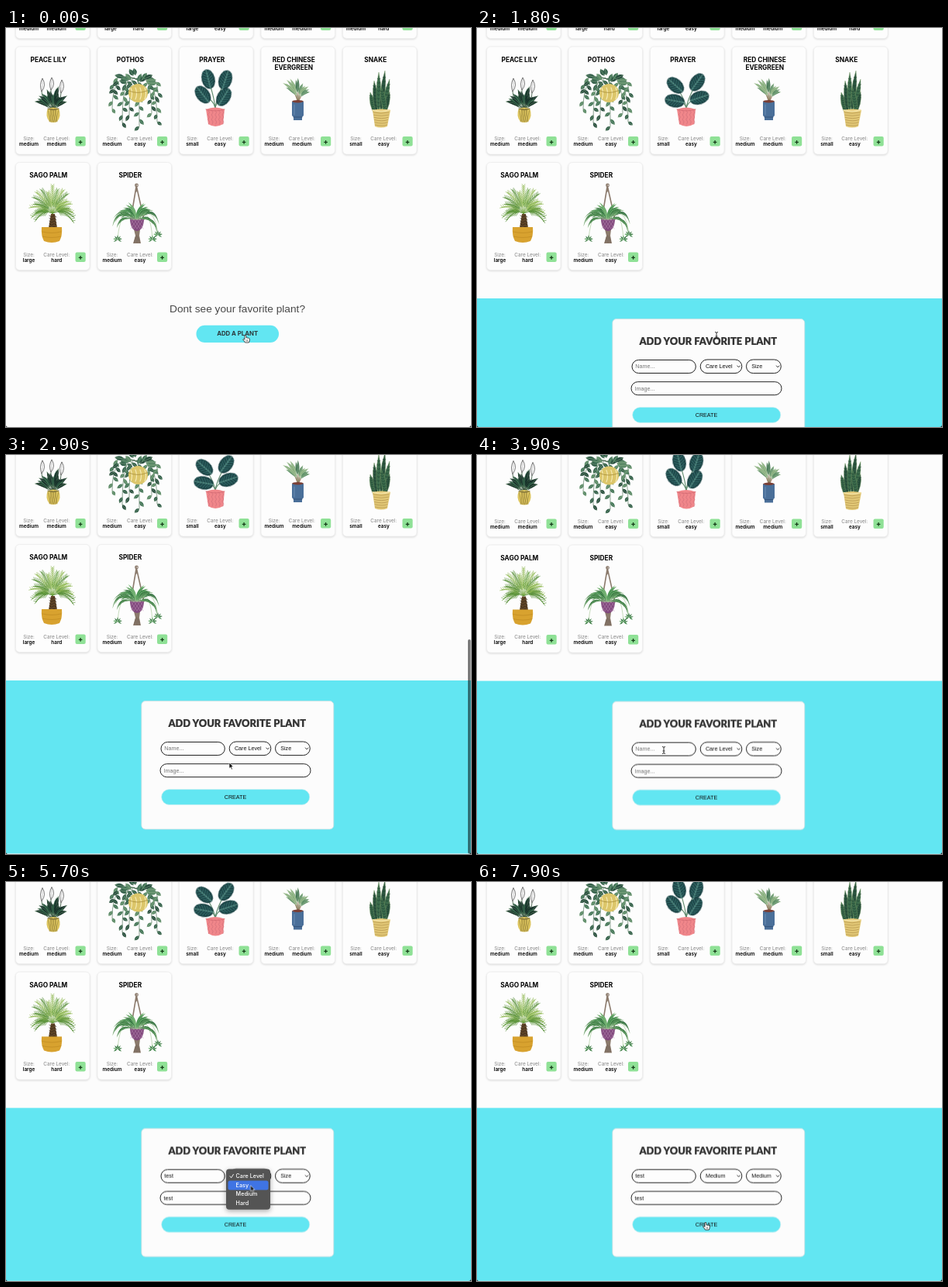
Write an HTML page that moves like this. It is 600 px wide and 515 px high and loops after 8 s.

```html
<!DOCTYPE html>
<html lang="en">
<head>
<meta charset="utf-8">
<title>Add a plant</title>
<style>
html, body { margin: 0; width: 100%; height: 100%; overflow: hidden; background: #fcfcfc; }
svg { display: block; width: 600px; height: 515px; }
text { font-family: "Liberation Sans", Arial, sans-serif; font-size: 7.2px; fill: #111; }
.mid { text-anchor: middle; }
.name { font: 700 8.3px Inter, sans-serif; fill: #000; }
.label { font: 400 6.4px Inter, sans-serif; fill: #858585; }
.value { font: 600 6.4px Inter, sans-serif; fill: #000; }
.plus { font: 800 9px Inter, sans-serif; fill: #143a18; }
.ask { font-size: 13.7px; fill: #484848; }
.add { font: 700 7.8px Inter, sans-serif; fill: #2c3a3d; }
.heading { font: 900 12.9px Lato, sans-serif; fill: #333; stroke: #333; stroke-width: .2; stroke-linejoin: round; }
.hint { fill: #757575; }
.item { font: 500 7.2px Inter, sans-serif; fill: #fff; }
.card { fill: #fdfdfd; stroke: #ececec; stroke-width: .8; filter: drop-shadow(0 1px 1px #0002); }
.field { fill: #fdfdfd; stroke: #222; }
.popup { fill: #545454; filter: drop-shadow(0 2px 3px #0005); }
.line { fill: none; stroke-linecap: round; stroke-linejoin: round; }
.leaf { animation: fold 4s ease-in-out infinite; }
.stem { fill: none; stroke: #5e8a6c; stroke-width: 1.1; animation: sway 4s ease-in-out infinite; }
#page { animation: scroll 8s linear infinite; }
#bar { animation: bar 8s linear infinite; }
#cursor { animation: move 8s ease-in-out infinite; }
@keyframes fold {
  0%, 30%, 88%, 100% { transform: var(--up); }
  36%, 82% { transform: var(--down); }
}
@keyframes sway {
  0%, 30%, 88%, 100% { d: var(--up); }
  36%, 82% { d: var(--down); }
}
@keyframes scroll {
  0%, 23.75% { transform: translateY(0); animation-timing-function: cubic-bezier(.3, .1, .3, 1); }
  32.5%, 37.5% { transform: translateY(-58px); }
  40%, 100% { transform: translateY(-57.4px); }
}
@keyframes bar {
  0%, 23.7% { opacity: 0; transform: translateY(-31px); }
  24.5% { opacity: 1; transform: translateY(-31px); animation-timing-function: cubic-bezier(.3, .1, .3, 1); }
  32.5%, 38% { opacity: 1; transform: none; }
  41%, 100% { opacity: 0; transform: none; }
}
@keyframes move {
  0%, 27% { transform: translate(309px, 397px); }
  33%, 38% { transform: translate(288px, 397px); }
  46%, 63% { transform: translate(241px, 381px); }
  66.5%, 69% { transform: translate(312px, 381px); }
  72% { transform: translate(316px, 393px); }
  74%, 75.5% { transform: translate(318px, 403px); }
  78%, 79% { transform: translate(364px, 382px); }
  81%, 81.8% { transform: translate(376px, 394px); }
  84%, 85.5% { transform: translate(373px, 403px); }
  89%, 90% { transform: translate(304px, 470px); }
  96%, 100% { transform: translate(295px, 440px); }
}
</style>
</head>
<body>
<svg id="stage" viewBox="0 0 600 515"></svg>
<script>
const LOOP = 8000, CYAN = '#62e6f2';
const sheet = document.head.appendChild(document.createElement('style'));
let shows = 0, seed = 7;

const rnd = (a, b) => {
  seed = (seed * 16807) % 2147483647;
  return a + (b - a) * seed / 2147483647;
};
const pick = list => list[Math.floor(rnd(0, list.length))];
const times = (n, fn) => Array.from({ length: n }, (_, i) => fn(i, n > 1 ? i / (n - 1) : 0)).join('');
const r1 = v => +v.toFixed(1);

// Style attribute that makes an element visible only in the given time spans.
function show(...spans) {
  const id = 'show' + shows++;
  const steps = spans.map(([a, b]) => `${a / LOOP * 100}%{opacity:1}${b / LOOP * 100}%{opacity:0}`).join('');
  sheet.append(`@keyframes ${id}{0%{opacity:0}${steps}}`);
  return `style="animation:${id} ${LOOP}ms step-end infinite"`;
}
const text = (s, x, y, cls = '', extra = '') => `<text x="${x}" y="${y}" class="${cls}" ${extra}>${s}</text>`;
const rect = (x, y, w, h, r, attrs) => `<rect x="${x}" y="${y}" width="${w}" height="${h}" rx="${r}" ${attrs}/>`;
const shape = (d, fill, attrs = '') => `<path d="${d}" fill="${fill}" ${attrs}/>`;
const line = (d, color, w = 1) => `<path class="line" d="${d}" stroke="${color}" stroke-width="${w}"/>`;
const polar = (x, y, deg, r) => {
  const a = deg * Math.PI / 180;
  return [x + Math.sin(a) * r, y - Math.cos(a) * r];
};
const quad = (a, b, c, t) => [0, 1].map(i => (1 - t) ** 2 * a[i] + 2 * t * (1 - t) * b[i] + t * t * c[i]);

// Pointed leaf from base to tip; bend bows it sideways.
function blade([x0, y0], [x1, y1], w, fill, bend = 0, vein = '', attrs = '') {
  const dx = x1 - x0, dy = y1 - y0, len = Math.hypot(dx, dy);
  const ctrl = k => `${r1((x0 + x1) / 2 - dy / len * k)} ${r1((y0 + y1) / 2 + dx / len * k)}`;
  const from = `${r1(x0)} ${r1(y0)}`, to = `${r1(x1)} ${r1(y1)}`;
  return shape(`M${from}Q${ctrl(bend + w)} ${to}Q${ctrl(bend - w)} ${from}`, fill, attrs) +
    (vein && line(`M${from}Q${ctrl(bend)} ${to}`, vein, .4));
}

function peaceLily() {
  const root = [61, 105];
  const buds = [[46, 82, 65], [58, 80, 64], [71, 84, 67]].map(([x, y, top]) =>
    line(`M${root}Q${x} 96 ${x} ${y}`, '#35523c', .8) +
    blade([x, y], [x + 1, top], 5, '#fff', 1, '#777', 'stroke="#222" stroke-width=".6"')).join('');
  const leaves = times(16, (i, u) => {
    const a = (u - .5) * 122 + rnd(-6, 6), r = rnd(16, 31) * (1 - Math.abs(u - .5) * .4);
    const tip = polar(...root, a, r + 2);
    return line(`M${root}L${polar(...root, a, r * .4)}`, '#28452f', .7) +
      blade(polar(...root, a, r * .3), tip, 4.4, pick(['#19352a', '#24503c', '#16302a']), -a / 16, '#8fb58a');
  });
  const pot = shape('M54 104Q61 101 68 104Q72 113 66 121Q61 123 56 121Q50 113 54 104', '#dcc45e') +
    times(4, i => line(`M${54 + i * 3} ${105 - i % 2}L${58 + i * 2.6} 121M${68 - i * 3} ${105 - i % 2}L${64 - i * 2.6} 121`, '#7d6b2e', .45)) +
    line('M54 104Q61 107 68 104', '#3e3a20', .7);
  return buds + leaves + pot;
}

function pothos() {
  const greens = ['#34604b', '#447559', '#284d3e', '#5c8a68'];
  const root = [168, 66];
  const pot = '<ellipse cx="170.500" cy="84" rx="12.500" ry="12" fill="#dcc66a"/>' +
    times(4, i => line(`M${161 + i * 6} 77q3 8 0 15`, '#f5eab4', 1.2)) +
    line('M158.500 81Q170 86 182 81', '#a98f3a', .8);
  const ends = [[138, 80], [137, 104], [150, 122], [159, 112], [172, 127], [188, 110], [195, 121], [196, 84]];
  const vines = ends.map(end => {
    const mid = [end[0], 54], n = Math.round((end[1] - 38) / 9);
    return line(`M${root}Q${mid} ${end}`, '#3f6348', .6) + times(n, (i, u) => {
      const p = quad(root, mid, end, .4 + u * .6);
      return blade(p, polar(...p, 180 + (i % 2 ? 42 : -42) + rnd(-15, 15), rnd(7, 10)), 4.4, pick(greens), 0, '#a8c59c');
    });
  }).join('');
  const crown = times(12, (i, u) => {
    const p = [153 + u * 31, 68 + rnd(-7, 3)];
    return blade(p, polar(...p, (u - .5) * 190 + rnd(-25, 25), rnd(9, 13)), 5.6, pick(greens), 0, '#a8c59c');
  });
  return vines + pot + crown;
}

// Leaves lift and lower; each has a raised and a lowered [x, y, angle].
function prayer() {
  const poses = [
    [[254, 86, -38], [255, 94, -80]], [[281, 89, 32], [287, 90, 72]],
    [[261, 66, -14], [256, 74, -48]], [[283, 67, 18], [284, 70, 36]]
  ];
  const both = fn => poses.map(([up, down]) => [fn(...up), fn(...down)]);
  const vars = ([up, down]) => `style="--up:${up};--down:${down}"`;
  const stems = both((x, y) => `path('M270 106Q270 94 ${x} ${y}')`).map(p => `<path class="stem" ${vars(p)}/>`).join('');
  const rx = 8.6, ry = 12.8;
  const face = `<ellipse rx="${rx}" ry="${ry}" fill="#1d4547"/>` +
    times(6, (i, u) => {
      const k = (u - .5) * 1.35 * ry, w = rx * .74 * Math.sqrt(1 - (k / ry) ** 2);
      return line(`M${r1(-w)} ${r1(k - 2)}L0 ${r1(k + 2)}L${r1(w)} ${r1(k - 2)}`, '#458a86', .7);
    }) + line(`M0 ${1 - ry}V${ry}`, '#82bfae', .7);
  const leaves = both((x, y, a) => `translate(${x}px,${y}px) rotate(${a}deg)`)
    .map(p => `<g class="leaf" ${vars(p)}>${face}</g>`).join('');
  const pot = shape('M258 105Q270 100 282 105L280 124Q270 130 261 124Z', '#f0868a') +
    times(5, i => line(`M${260.5 + i * 4.6} 106l2 3l-2 3l2 3l-2 3l2 3l-1 3`, '#d0707a', .7)) +
    line('M258 105Q270 109 282 105', '#d66d74', .9);
  return stems + leaves + pot;
}

function evergreen() {
  const root = [377, 96];
  const leaves = times(13, (i, u) => {
    const a = (u - .5) * 88 + rnd(-5, 5), r = rnd(20, 33);
    const start = polar(...root, a * .55, r * .4), tip = polar(...root, a, r);
    return line(`M${root}L${start}`, i % 3 ? '#6d8a5a' : '#b8605a', .6) +
      blade(start, tip, 3.4, pick(['#5d8f67', '#3f7351', '#86ad7d']), -a / 12, '#cfe0bd');
  });
  return leaves + '<ellipse cx="376.500" cy="95" rx="7.500" ry="2" fill="#7a3f35"/>' +
    shape('M369 95Q376.500 98 384 95V113L382 115V119H371V115L369 113Z', '#4a6f99') +
    line('M371 115H382', '#2f4d73', .8) + line('M372 99V112', '#6d90b6', 1);
}

function snake() {
  const tips = [[470, 83], [475, 68], [481, 57], [489, 55], [495, 66], [495, 82], [484, 76]];
  const leaves = tips.map(([x, y], i) => {
    const base = [476 + i * 2.4, 112];
    return blade(base, [x, y], 6.2, i % 2 ? '#2c5540' : '#3a6a4b', 0, '', 'stroke="#7f9f69" stroke-width=".4"') +
      times(8, (k, u) => {
        const p = quad(base, [(base[0] + x) / 2, (base[1] + y) / 2], [x, y], .2 + u * .65);
        return line(`M${r1(p[0] - 1.8)} ${r1(p[1])}l1.8 1l1.8 -1`, '#1c3b2c', .6);
      });
  }).join('');
  return leaves + shape('M473 106Q484 103 496 106L492 127Q484 130 476 127Z', '#e2c876') +
    times(6, i => line(`M${474 + i * .5} ${109 + i * 3.2}q10 2.500 ${20 - i} 0`, '#a98944', .6)) +
    line('M473 106Q484 109 495 106', '#f3e2a5', 1.5);
}

function sago() {
  const root = [60, 239];
  const fronds = times(19, (i, u) => {
    const a = (u - .5) * 225, r = rnd(23, 36) * (Math.abs(a) > 75 ? .82 : 1);
    const mid = polar(...root, a * .6, r * .6), tip = polar(...root, a, r);
    const leaflets = times(10, (k, v) => {
      const p = quad(root, mid, tip, .25 + v * .72);
      return [-32, 32].map(s => `M${p.map(r1)}L${polar(...p, a + s, 6 - v * 2.5).map(r1)}`).join('');
    });
    const color = pick(['#4f8a2e', '#2f5a22', '#8db84e', '#5f9a35']);
    return line(`M${root}Q${mid} ${tip}` + leaflets, color, .6);
  });
  return shape('M55 258L58 240H63L66 258Z', '#5f4527') +
    times(5, i => line(`M56 ${242 + i * 3.5}l3 2l3 -2l3 2`, '#35271a', .7)) + fronds +
    shape('M46 257H72Q73 268 69 275Q59 279 49 275Q45 268 46 257', '#d8a22f') +
    line('M47 263Q59 266 71 263M47 269Q59 272 71 269', '#bb861f', .6);
}

function spider() {
  const greens = ['#3f8a4a', '#2c6b3b', '#62a765', '#3c7d44'];
  const ropes = line('M168 205L161 247M168.500 205L178 247M168 202V211', '#8b7a6c', 1.6) +
    '<circle cx="168.500" cy="203" r="1.800" fill="none" stroke="#8b7a6c" stroke-width="1.200"/>';
  const tassel = shape('M165 260H173L172 268L174 278H164L167 268Z', '#8b7a6c') +
    line('M167 270L166 277M169 268V277M171 270L172 277', '#63564c', .6);
  const pot = shape('M160 245H178Q178 261 169 262Q160 261 160 245', '#80487c') +
    times(4, i => line(`M${161 + i * 4} 247l4 6l-4 6M${165 + i * 4} 247l-4 6l4 6`, '#b98bb2', .5));
  const leaves = times(24, (i, u) => {
    const s = u * 2 - 1, side = Math.sign(s), reach = Math.abs(s);
    const tip = [168 + side * (9 + reach * rnd(18, 23)), 224 + reach * rnd(20, 48)];
    return blade([168 + s * 5, 247], tip, 2.9, pick(greens), -side * (4 + reach * rnd(10, 20)), '#b9d8a6');
  });
  const babies = [[144, 273], [189, 273], [196, 267]].map(p =>
    line(`M169 247Q${(p[0] + 169) / 2 + (p[0] - 169) * .35} 225 ${p}`, '#8fb878', .5) +
    times(7, (i, u) => blade(p, polar(...p, -120 + u * 240, 6), 1.6, pick(greens)))).join('');
  return ropes + tassel + pot + babies + leaves;
}

function card(col, top, name, size, care, plant) {
  const x = 12.5 + col * 105.5;
  const wide = size === 'medium' && care === 'easy';
  const sx = x + (wide ? 19 : 17), cx = x + (wide ? 55 : 52.8);
  const title = [name].flat().map((s, i) => text(s, x + 42.3, top + 19.6 + i * 10, 'name mid')).join('');
  return rect(x, top, 95.5, 139, 5, 'class="card"') + title + (plant ? plant() : '') +
    text('Size:', sx, top + 121.2, 'label mid') + text(size, sx, top + 128.2, 'value mid') +
    text('Care Level:', cx, top + 121.2, 'label mid') + text(care, cx, top + 128.2, 'value mid') +
    rect(x + 77, top + 116, 13.2, 12.5, 2, 'fill="#8fe196"') + text('+', x + 83.6, top + 125.6, 'plus mid');
}

const cards = [
  [0, -125.5, '', 'medium', 'medium'], [1, -125.5, '', 'large', 'hard'], [2, -125.5, '', 'large', 'easy'],
  [3, -125.5, '', 'medium', 'medium'], [4, -125.5, '', 'medium', 'hard'],
  [0, 24, 'PEACE LILY', 'medium', 'medium', peaceLily], [1, 24, 'POTHOS', 'medium', 'easy', pothos],
  [2, 24, 'PRAYER', 'small', 'easy', prayer],
  [3, 24, ['RED CHINESE', 'EVERGREEN'], 'medium', 'medium', evergreen], [4, 24, 'SNAKE', 'small', 'easy', snake],
  [0, 173.5, 'SAGO PALM', 'large', 'hard', sago], [1, 173.5, 'SPIDER', 'medium', 'easy', spider]
].map(c => card(...c)).join('');

const OPEN = 1200, NAME = 4000, IMAGE = 4550, CARE = [5350, 6000], SIZE = [6300, 6850];

const prompt = `<g ${show([0, OPEN])}>` +
  text('Dont see your favorite plant?', 298.5, 367, 'ask mid') +
  rect(245.5, 383.8, 106.5, 22.2, 11, `fill="${CYAN}"`) + text('ADD A PLANT', 298.7, 397.3, 'add mid') + '</g>';

// Field text typed letter by letter, with its caret.
function typed(hint, x, y, keys, focus, blur) {
  const word = 'test', ends = [0, 2, 6, 9.6, 11.6];
  const marks = [focus, ...keys, blur];
  return text(hint, x, y, 'hint', show([0, keys[0]])) +
    keys.map((k, i) => text(word.slice(0, i + 1), x, y, '', show([k, keys[i + 1] || LOOP]))).join('') +
    ends.map((w, i) => rect(x + w + .3, y - 6.5, .7, 8, 0, show([marks[i], marks[i + 1]]))).join('');
}
function select(x, w, label, chosenAt) {
  return rect(x, 428, w, 17.6, 8.8, 'class="field"') +
    text(label, x + 6.7, 439.4, '', show([0, chosenAt])) + text('Medium', x + 6.7, 439.4, '', show([chosenAt, LOOP])) +
    line(`M${x + w - 6} 436l1.800 1.900l1.800 -1.900`, '#222', .9);
}
const form = `<g ${show([OPEN, LOOP])}>` + rect(0, 349, 600, 223.4, 0, `fill="${CYAN}"`) +
  rect(174.8, 375.6, 248, 165.4, 5, 'fill="#fcfcfc" stroke="#c9dfe1" stroke-width=".8"') +
  text('ADD YOUR FAVORITE PLANT', 298.3, 409.3, 'heading mid') +
  rect(200, 428.5, 82.3, 17, 8.5, 'class="field"') +
  typed('Name...', 204.3, 439.4, [4100, 4200, 4300, 4400], NAME, IMAGE) +
  select(288.2, 53.6, 'Care Level', CARE[1]) + select(347.5, 44.8, 'Size', SIZE[1]) +
  rect(199, 456.7, 194, 17, 8.5, 'class="field"') +
  typed('Image...', 203.6, 467.6, [4650, 4750, 4850, 4950], IMAGE, 5300) +
  rect(200.6, 489.6, 191.2, 19.8, 9.9, `fill="${CYAN}" stroke="#d4eef0" stroke-width=".6"`) +
  text('CREATE', 296, 502, 'mid') + '</g>';

// Dark option list; hovers holds the start time of each option's highlight.
function popup(x, w, items, hovers, [from, to]) {
  const ends = [...hovers.slice(1), to];
  return `<g ${show([from, to])}>` + rect(x, 370.5, w, 52.2, 4, 'class="popup"') +
    hovers.map((h, i) => rect(x + 2.5, 374 + i * 11.6, w - 5, 11.8, 2.5, `fill="#3f74e4" ${show([h, ends[i]])}`)).join('') +
    line(`M${x + 5} 379.800l1.600 2l2.800 -4.400`, '#fff', .9) +
    items.map((s, i) => text(s, x + 12.6, 382.2 + i * 11.6, 'item')).join('') + '</g>';
}
const popups =
  popup(284, 57, ['Care Level', 'Easy', 'Medium', 'Hard'], [5350, 5650, 5850], CARE) +
  popup(343, 47.5, ['Size', 'Small', 'Medium', 'Large'], [6300, 6400, 6650], SIZE);

const cursor = '<g id="cursor">' +
  `<g ${show([0, OPEN], [7380, LOOP])}>` +
  shape('M-1 0Q0 -1.500 1 0V3Q2 2.200 2.600 3.200Q3.600 2.500 4.200 3.600Q5.400 3.300 5.400 4.600Q5.400 7 4.300 9H-.5Q-1.500 7 -3.300 5Q-3 3.700 -1 5Z', '#fff', 'stroke="#222" stroke-width=".8"') +
  line('M.9 5.500V7.500M2.500 5.500V7.500', '#222', .5) + '</g>' +
  `<g ${show([OPEN, 2100], [3450, 4100])}>` +
  line('M-1.600 -4.500Q0 -4.500 0 -3.500V3.500Q0 4.500 -1.600 4.500M1.600 -4.500Q0 -4.500 0 -3.500M0 3.500Q0 4.500 1.600 4.500M-1 1H1', '#222', .9) + '</g>' +
  `<g ${show([2100, 3450], [5050, 7380])}>` +
  shape('M0 0V7.600L1.700 6L3 9L4.300 8.400L3 5.500H5.300Z', '#111', 'stroke="#fff" stroke-width=".6"') + '</g></g>';

document.getElementById('stage').innerHTML =
  rect(0, 0, 600, 515, 0, 'fill="#fcfcfc"') + `<g id="page">${cards}${prompt}${form}</g>` + popups +
  rect(596, 238, 3.6, 276.5, 1.8, 'id="bar" fill="#000" fill-opacity=".52"') +
  shape('M0 512.500Q0 515 2.500 515H0ZM600 512Q600 515 597 515H600Z', '#111') + cursor;
</script>
</body>
</html>
```
